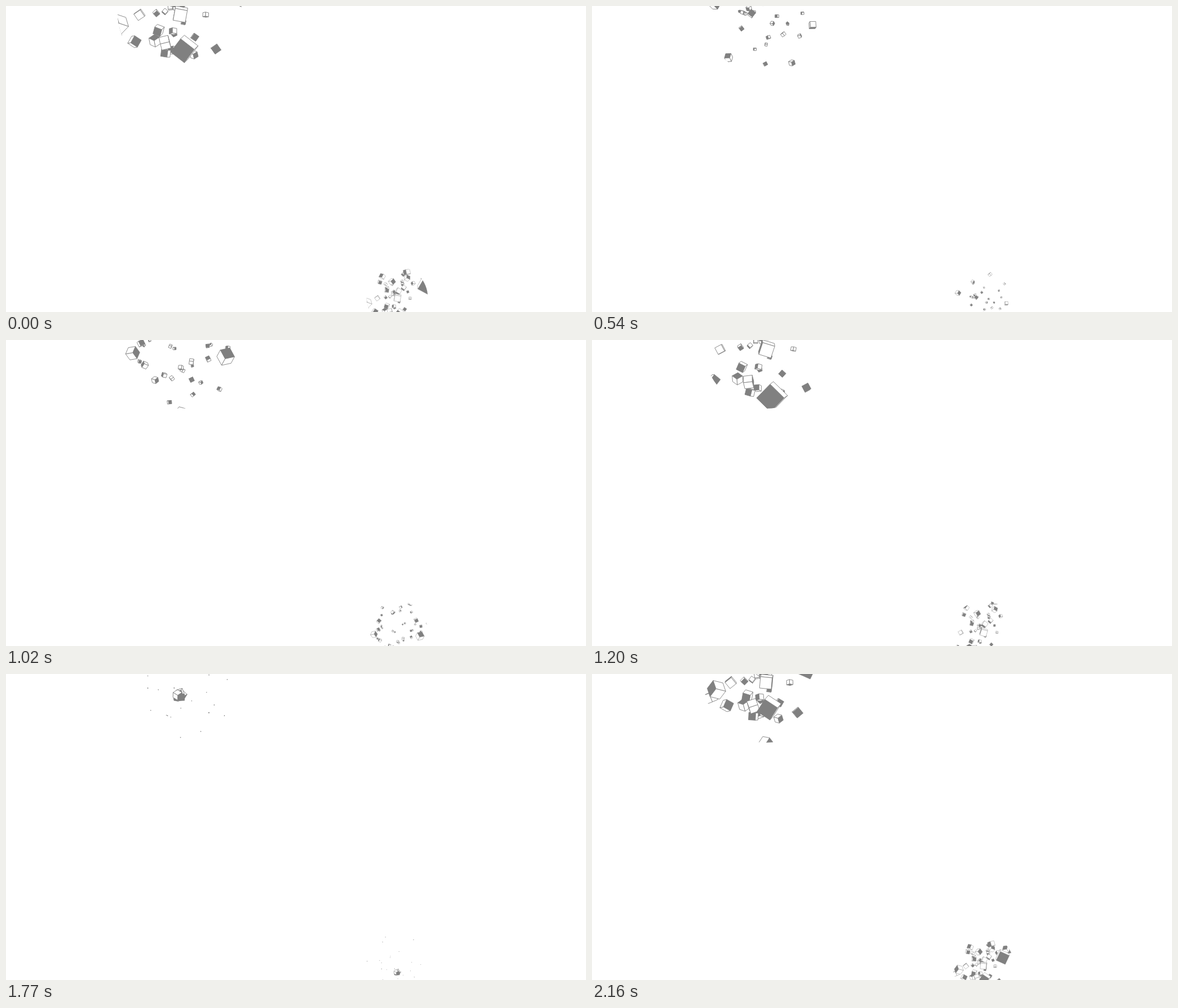
Write an HTML page with a canvas that moves like this. It is 1029 by 544 pixels and loops after 2190 ms.

```html
<!DOCTYPE html>
<html lang="en">
<head>
<meta charset="utf-8">
<title>Cube bursts</title>
<style>
  html, body { margin: 0; width: 100%; height: 100%; overflow: hidden; background: #fff; }
  canvas { display: block; }
</style>
</head>
<body>
<canvas id="stage" width="1029" height="544"></canvas>
<script>
const ctx = document.getElementById('stage').getContext('2d');
const GRAY = '#808080';
const STEP = 30, STEPS = 73;
const LIFE = 25, DRAG = 0.34, GRAVITY = 0.026;
const RADIUS = 110, REACH = 122, WIDTH = 19;
const lenses = [{ x: 308, y: 12, scale: 1 }, { x: 694, y: 517.7, scale: 0.494 }];

const random = n => {
  const v = Math.sin(n * 12.9898) * 43758.5453;
  return v - Math.floor(v);
};

// Throw directions: a few leading cubes near the viewer, the rest scattered.
function scatter(seed, count, leads = []) {
  const cubes = leads.map(([x, y, z], i) => ({ x, y, z, seed: seed + i }));
  for (let i = leads.length; i < count; i++) {
    const n = seed + i;
    const r = REACH * Math.sqrt(random(n + 0.11)), angle = 6.283 * random(n + 0.37);
    cubes.push({
      x: r * Math.cos(angle), y: r * Math.sin(angle),
      z: 1.45 * random(n + 0.59) - 1, seed: n
    });
  }
  return cubes.sort((a, b) => a.z - b.z);
}

const wide = scatter(10, 46, [
  [1, 1, 0.6], [4, 30, 0.8], [34, -15, 0.95], [-73, 13, 0.6], [-40, 33, 0.2], [-29, 84, 0.1]
]);
const loose = scatter(200, 36, [[57, 11, 0.33], [-18, -3, 0.3], [-47, 53, 0.3], [45, 82, 0.05]]);
const dense = scatter(300, 50, [[27, 1, 0.68], [-35, 0, 0.59], [-47, 20, 0.25]]);
const faint = scatter(400, 28);
const extra = scatter(500, 36);

// Age advances by rate with each step; a new burst replaces the last one.
const bursts = [
  { start: -4.5, rate: 1, cubes: wide },
  { start: 11.5, rate: 1.9, cubes: loose },
  { start: 28, rate: 2.25, cubes: dense },
  { start: 37, rate: 2, cubes: wide },
  { start: 50, rate: 2.65, cubes: faint },
  { start: 60, rate: 3, cubes: extra },
  { start: 68.5, rate: 1, cubes: wide }
];

// The three face normals of a tumbling cube.
function axes(seed, age) {
  const a = random(seed) * 6.28 + age * 0.08;
  const b = random(seed + 0.3) * 6.28 + age * 0.06;
  const c = random(seed + 0.7) * 6.28;
  const [ca, sa, cb, sb, cc, sc] =
    [Math.cos(a), Math.sin(a), Math.cos(b), Math.sin(b), Math.cos(c), Math.sin(c)];
  return [
    [ca * cb, sa * cb, -sb],
    [ca * sb * sc - sa * cc, sa * sb * sc + ca * cc, cb * sc],
    [ca * sb * cc + sa * sc, sa * sb * cc - ca * sc, cb * cc]
  ];
}

function drawCube({ x, y, width, seed, age }) {
  const half = width / 2.7;
  const normals = axes(seed, age);
  normals.forEach((normal, i) => {
    const side = normal[2] < 0 ? -1 : 1;
    const u = normals[(i + 1) % 3], v = normals[(i + 2) % 3];
    ctx.beginPath();
    for (const [p, q] of [[-1, -1], [1, -1], [1, 1], [-1, 1]]) {
      ctx.lineTo(x + half * (side * normal[0] + p * u[0] + q * v[0]),
                 y + half * (side * normal[1] + p * u[1] + q * v[1]));
    }
    ctx.closePath();
    ctx.fillStyle = i === 0 ? GRAY : '#fff';
    ctx.fill();
    ctx.stroke();
  });
}

// Drag slows the throw, gravity pulls it down, depth magnifies all of it.
function cubesAt(cubes, age) {
  const spread = 1 - Math.exp(-DRAG * age);
  const width = WIDTH * Math.max(0, 1 - age / LIFE);
  const list = cubes.map(({ x, y, z, seed }) => {
    const zoom = 1 / (1 - z * spread);
    return {
      x: x * spread * zoom,
      y: (y * spread + GRAVITY * age * age) * zoom,
      width: width * zoom, seed, age
    };
  });
  return age > 17 ? list.concat(rocket(age)) : list;
}

// The next charge climbs into view as a tight clump of cubes.
function rocket(age) {
  const radius = Math.max(2, 5.5 + 1.375 * (age - 20));
  const y = 77 - 13.25 * (age - 20);
  return [0, 1, 2, 3, 4].map(i => ({
    x: Math.cos(i * 2.4) * radius * 0.35,
    y: y + Math.sin(i * 2.4) * radius * 0.4,
    width: radius * 1.4, seed: i + 90, age
  }));
}

function draw(now) {
  const step = Math.floor(now / STEP) % STEPS;
  const burst = bursts.filter(b => b.start <= step).pop();
  const cubes = cubesAt(burst.cubes, (step - burst.start) * burst.rate);
  ctx.fillStyle = '#fff';
  ctx.fillRect(0, 0, 1029, 544);
  for (const { x, y, scale } of lenses) {
    ctx.save();
    ctx.translate(x, y);
    ctx.scale(scale, scale);
    ctx.beginPath();
    ctx.arc(0, 0, RADIUS, 0, 7);
    ctx.clip();
    ctx.strokeStyle = GRAY;
    ctx.lineWidth = 0.9;
    ctx.lineJoin = 'round';
    cubes.forEach(drawCube);
    ctx.restore();
  }
}

const begin = performance.now();
function tick() {
  draw(performance.now() - begin);
  requestAnimationFrame(tick);
}
tick();
</script>
</body>
</html>
```
